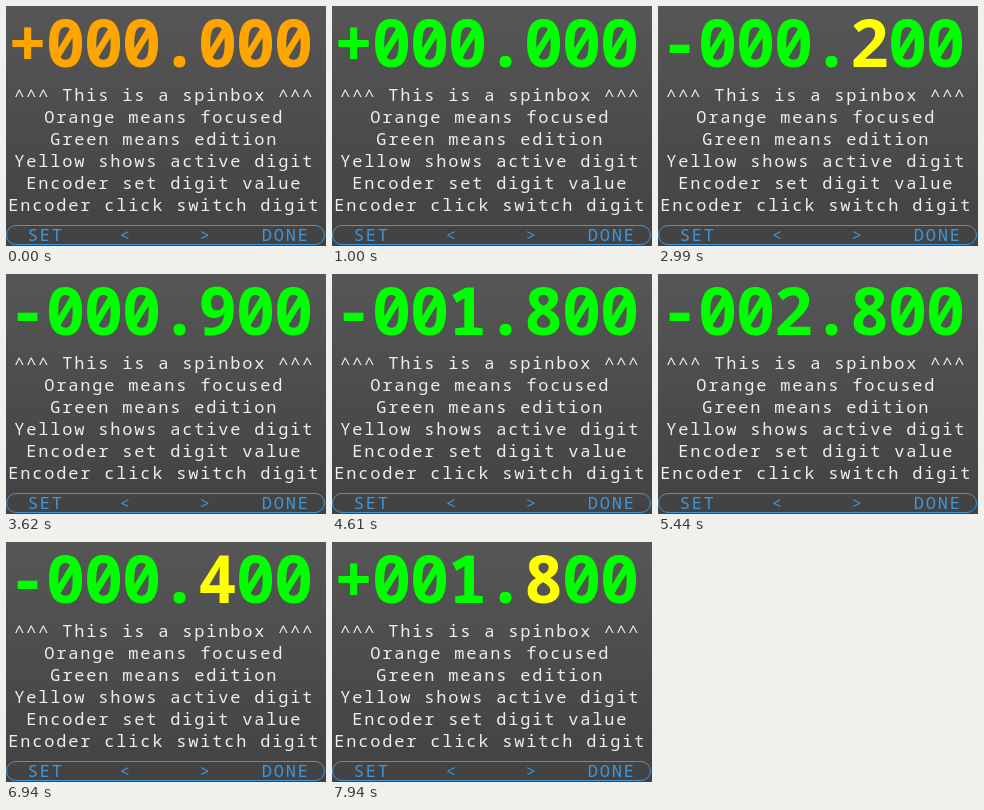
Write an HTML page that moves like this. It is 320 px wide and 240 px high and loops after 8000 ms.

```html
<!DOCTYPE html>
<html lang="en">
<head>
<meta charset="utf-8">
<title>Spinbox</title>
<style>
  html, body { margin: 0; width: 100%; height: 100%; overflow: hidden; background: #444; }
  svg { display: block; width: 320px; height: 240px; }
  text { font-family: "Noto Sans Mono", "DejaVu Sans Mono", monospace; text-anchor: middle; white-space: pre; }
  .small { font-size: 17px; letter-spacing: 1.8px; fill: #eee; }
  .key { fill: #4296d8; }
  .digit { font-size: 66px; font-weight: 600; }
</style>
</head>
<body>
<svg id="stage" viewBox="0 0 320 240">
  <defs>
    <linearGradient id="shade" x2="0" y2="1">
      <stop stop-color="#565656"/>
      <stop offset="1" stop-color="#424242"/>
    </linearGradient>
  </defs>
  <rect width="320" height="240" fill="url(#shade)"/>
  <rect x=".5" y="219.5" width="318" height="19" rx="9.5" fill="none" stroke="#4296d8"/>
</svg>
<script>
const LOOP = 8000, EDIT_START = 1000, BLINK_START = 2000, BLINK = 490, REFRESH = 65, ACTIVE = 5;
const ORANGE = '#ffa500', GREEN = '#00ff00', YELLOW = '#ffff00';

// Encoder turns: start, end, value reached in tenths
const turns = [
  [2680, 2810, -2], [2990, 3290, -5], [3430, 3620, -9],
  [4000, 4610, -18], [4970, 5440, -28], [5690, 5950, -17],
  [6310, 6490, -9], [6800, 7050, 0], [7300, 7560, 14], [7800, 7940, 18]
];

const stage = document.getElementById('stage');

function addText(str, cls, x, y) {
  const el = document.createElementNS('http://www.w3.org/2000/svg', 'text');
  el.setAttribute('class', cls);
  el.setAttribute('x', x);
  el.setAttribute('y', y);
  el.textContent = str;
  return stage.appendChild(el);
}

const digits = Array.from({ length: 8 }, (_, i) =>
  addText('', 'digit', 211.5 + (i - ACTIVE) * 38, 60.5));

[
  '^^^ This is a spinbox ^^^',
  'Orange means focused',
  'Green means edition',
  'Yellow shows active digit',
  'Encoder set digit value',
  'Encoder click switch digit'
].forEach((line, i) => addText(line, 'small', 158.3, 95 + i * 22));

['SET', '<', '>', 'DONE'].forEach((label, i) =>
  addText(label, 'small key', 39.7 + i * 80, 235));

// Each turn moves in equal steps, one per display refresh
function valueAt(time) {
  let value = 0;
  for (const [from, to, target] of turns) {
    if (time < from) break;
    const count = Math.round((to - from) / REFRESH);
    const step = Math.floor(Math.min(1, (time - from) / (to - from)) * count);
    value += (target - value) * (step + 1) / (count + 1);
  }
  return Math.round(value);
}

function format(tenths) {
  const number = (Math.abs(tenths) / 10).toFixed(3).padStart(7, '0');
  return (tenths < 0 ? '-' : '+') + number;
}

function draw(time) {
  const chars = format(valueAt(time));
  const color = time < EDIT_START ? ORANGE : GREEN;
  const lit = time >= BLINK_START && Math.floor((time - BLINK_START) / BLINK) % 2 === 0;
  digits.forEach((el, i) => {
    el.textContent = chars[i];
    el.setAttribute('fill', lit && i === ACTIVE ? YELLOW : color);
  });
}

const start = performance.now();
function tick() {
  draw((performance.now() - start) % LOOP);
  requestAnimationFrame(tick);
}
tick();
</script>
</body>
</html>
```
